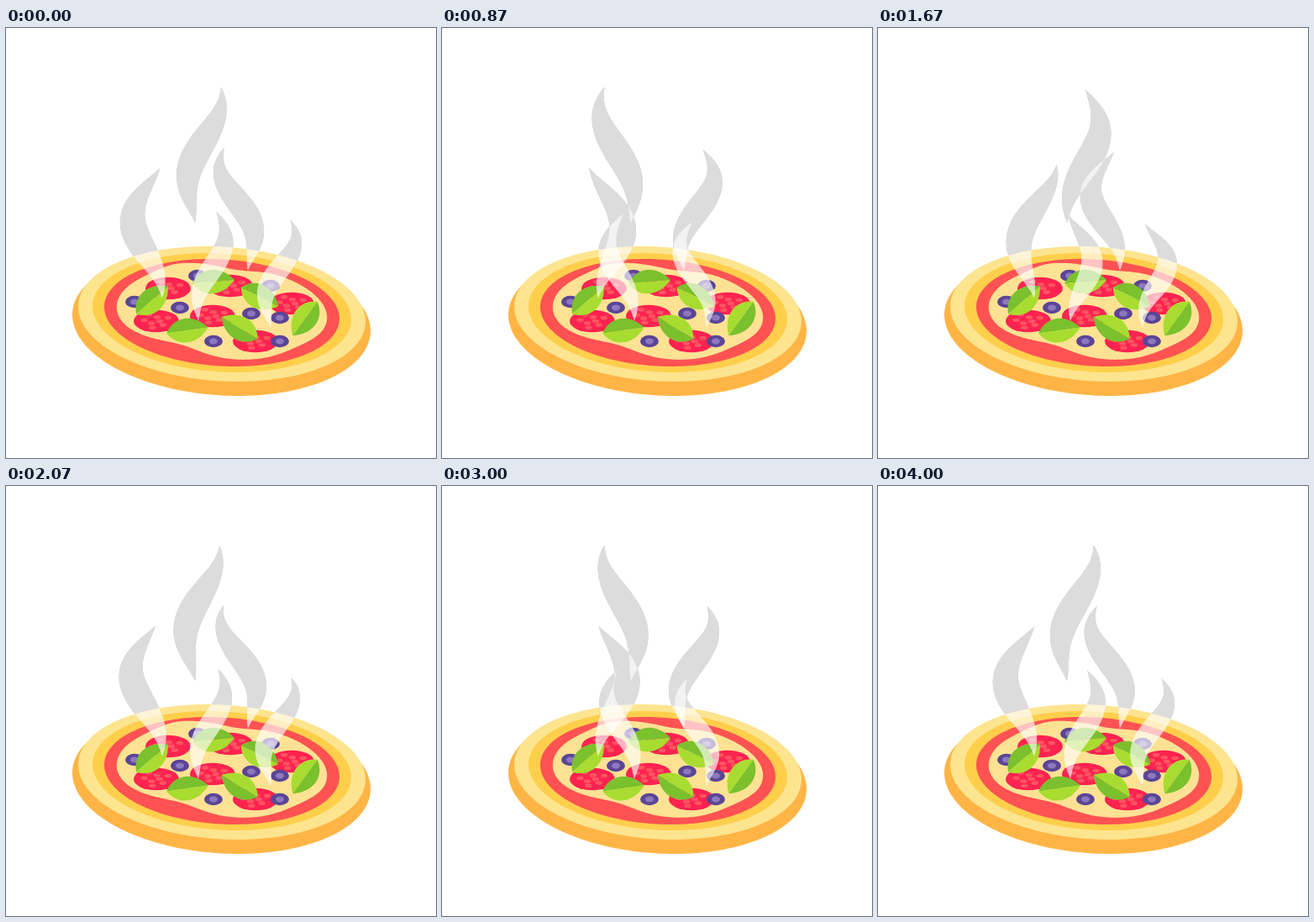
An HTML page with a canvas for the animation above (4.03 s loop, 512 by 512 pixels).

```html
<!DOCTYPE html>
<html lang="en">
<head>
<meta charset="utf-8">
<title>Hot pizza</title>
<style>
  html, body { margin: 0; width: 100%; height: 100%; overflow: hidden; background: #fff; }
  canvas { display: block; width: 512px; height: 512px; }
</style>
</head>
<body>
<canvas id="stage" width="512" height="512"></canvas>
<script>
const ctx = document.getElementById('stage').getContext('2d');
const TAU = Math.PI * 2;
const RAD = Math.PI / 180;
const PERIOD = 2015;
const SKEW = 0.11;
const STEPS = 48;

const salami = [[193, 310], [267, 307], [340, 328], [179, 349], [246, 343], [297, 373]];
const olives = [
  [228, 295], [153, 326], [207, 333], [315, 307],
  [292, 340], [326, 345], [247, 373], [326, 373]
];
// centre and angle; the dark half lies on the left of the direction
const leaves = [
  [174, 324, -41], [247, 302, -5], [302, 320, 27],
  [216, 360, -8], [278, 357, 211], [356, 346, 126]
];
// foot, height, phase at the tip, phase lag from tip to foot
const wisps = [
  { x: 225, y: 232, h: 159, phase: 0.25, lag: 2.6 },
  { x: 186, y: 322, h: 158, phase: 1.65, lag: 3.0 },
  { x: 288, y: 289, h: 144, phase: 2.88, lag: 3.3 },
  { x: 229, y: 349, h: 129, phase: -0.6, lag: 2.8 },
  { x: 315, y: 357, h: 126, phase: -0.38, lag: 3.4 }
];

function oval(c, x, y, rx, ry, color) {
  c.fillStyle = color;
  c.beginPath();
  c.ellipse(x, y, rx, ry, 0, 0, TAU);
  c.fill();
}

// closed curve on an ellipse whose right side hangs lower; radius depends on the angle
function disc(c, x, y, rx, ry, color, radius = () => 1) {
  c.fillStyle = color;
  c.beginPath();
  for (let deg = 0; deg < 360; deg++) {
    const r = radius(deg);
    c.lineTo(x + rx * r * Math.cos(deg * RAD), y + ry * r * Math.sin(deg * RAD + SKEW));
  }
  c.fill();
}

function cheeseEdge(deg) {
  const bump = (at, size, width) => size * Math.exp(-(((deg - at) / width) ** 2));
  return 0.895 + bump(42, -0.04, 20) + bump(118, -0.17, 26)
    + bump(247, 0.06, 14) + bump(280, -0.07, 14);
}

function drawSalami(c, x, y) {
  oval(c, x, y, 27, 13.3, '#ff2350');
  for (let i = 0; i < 8; i++) {
    const r = Math.sqrt((i + 0.3) / 8), a = i * 2.4;
    oval(c, x + 20 * r * Math.cos(a), y + 9 * r * Math.sin(a), 4.2, 2.3, '#ff5462');
  }
}

function drawOlive(c, x, y) {
  oval(c, x, y, 11, 7.2, '#5b4596');
  oval(c, x, y, 5, 3.5, '#8d78bd');
}

function drawLeaf(c, x, y, deg) {
  c.save();
  c.translate(x, y);
  c.rotate(deg * RAD);
  for (const side of [-1, 1]) {
    c.fillStyle = side < 0 ? '#7bc02d' : '#a8dc30';
    c.beginPath();
    c.moveTo(-25, 0);
    c.bezierCurveTo(-14, side * 19, 10, side * 19, 25, 0);
    c.fill();
  }
  c.restore();
}

function makePizza() {
  const layer = document.createElement('canvas');
  layer.width = layer.height = 512;
  const c = layer.getContext('2d');
  disc(c, 256.5, 351, 177.5, 87, '#ffb545');
  disc(c, 257, 340.5, 171, 80.5, '#fde48f');
  disc(c, 257, 339, 154, 71, '#ffcf4c');
  disc(c, 257, 339, 140, 64, '#ff5252');
  disc(c, 257, 339, 140, 64, '#fde294', cheeseEdge);
  salami.forEach(p => drawSalami(c, ...p));
  olives.forEach(p => drawOlive(c, ...p));
  leaves.forEach(p => drawLeaf(c, ...p));
  return layer;
}

// a wave climbs the spine; the body swells around it along the normals
function wispPath({ x, y, h, phase, lag }, angle) {
  const rise = h + 6 * (Math.cos(angle + phase) ** 2 - 0.5);
  const spine = u => {
    const sway = 0.25 * h * Math.max(0, Math.sin(u * Math.PI / 1.5)) ** 1.5;
    return [x + sway * Math.cos(angle + phase + lag * (1 - u)), y - rise * u];
  };
  const left = [], right = [];
  for (let i = 0; i <= STEPS; i++) {
    const u = i / STEPS;
    const [px, py] = spine(u);
    const [ax, ay] = spine(u - 0.01);
    const [bx, by] = spine(u + 0.01);
    const k = 0.1 * h * Math.sin(Math.PI * u) / Math.hypot(bx - ax, by - ay);
    const nx = (by - ay) * k, ny = (ax - bx) * k;
    left.push([px + nx, py + ny]);
    right.unshift([px - nx, py - ny]);
  }
  const path = new Path2D();
  left.concat(right).forEach(p => path.lineTo(...p));
  path.closePath();
  return path;
}

const pizza = makePizza();

function draw(now) {
  const angle = (now % PERIOD) / PERIOD * TAU;
  const paths = wisps.map(w => wispPath(w, angle));
  ctx.fillStyle = '#fff';
  ctx.fillRect(0, 0, 512, 512);
  // grey underlay shows the steam on white; the pizza hides it
  ctx.fillStyle = '#9c9c9c';
  paths.forEach(p => ctx.fill(p));
  ctx.drawImage(pizza, 0, 0);
  ctx.fillStyle = 'rgba(255,255,255,0.65)';
  paths.forEach(p => ctx.fill(p));
}

const start = performance.now();
function tick() {
  draw(performance.now() - start);
  requestAnimationFrame(tick);
}
tick();
</script>
</body>
</html>
```
